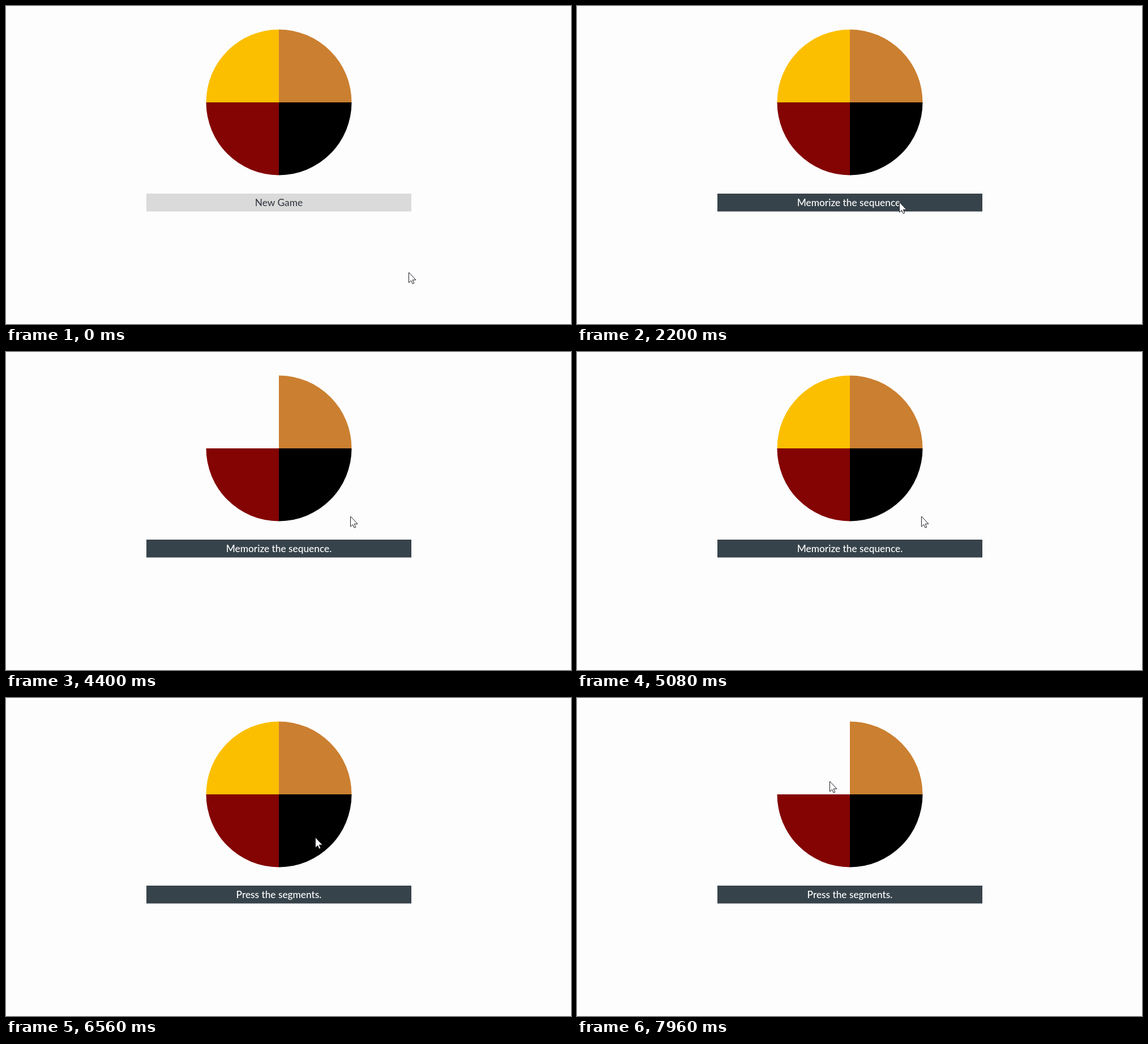
Animation, 998 px wide and 561 px high, one loop 8000 ms. Source, as an HTML page:

```html
<!DOCTYPE html>
<html lang="en">
<head>
<meta charset="utf-8">
<title>Memory game</title>
<style>
  html, body { margin: 0; width: 100%; height: 100%; overflow: hidden; background: #fdfdfd; }
  svg { display: block; width: 998px; height: 561px; }
  text { font: 500 17.3px Lato, sans-serif; text-anchor: middle; }
</style>
</head>
<body>
<svg viewBox="0 0 998 561">
  <defs><path id="quarter" d="M0 0V-128.5A128.5 128.5 0 0 1 128.5 0Z"/></defs>
  <g transform="translate(482 170)">
    <use href="#quarter" fill="#cb7f30"/>
    <use href="#quarter" fill="#000" transform="rotate(90)"/>
    <use href="#quarter" fill="#840303" transform="rotate(180)"/>
    <use href="#quarter" id="yellow" fill="#fcbf00" transform="rotate(270)"/>
  </g>
  <rect id="bar" x="248" y="331" width="468" height="31.5"/>
  <text id="label" x="482" y="353"></text>
  <path id="cursor" d="M.5 0V18L4.6 14.4L7.2 20.2L9.8 19L7.2 13.2H13Z"
        fill="#fff" stroke="#1c1c24"/>
</svg>
<script>
const LOOP = 8000;
const GLIDE = 700;       // duration of each cursor move
const START = 1960;      // button pressed
const TURN = 6000;       // player's turn begins
const PRESS = 7880;      // player presses the yellow segment

const home = { x: 711, y: 470 };
const stops = [
  { at: 1600, x: 569, y: 346 },   // button
  { at: 3240, x: 608, y: 290 },   // beside the disc
  { at: 5760, x: 589, y: 275 },
  { at: 6560, x: 546, y: 246 },   // black segment
  { at: 7640, x: 446, y: 147 }    // yellow segment
];

const [yellow, bar, label, cursor] =
  ['yellow', 'bar', 'label', 'cursor'].map(id => document.getElementById(id));
const clamp = u => Math.min(1, Math.max(0, u));
const ease = u => u * u * (3 - 2 * u);

function cursorAt(t) {
  let { x, y } = home;
  for (const stop of stops) {
    const u = ease(clamp((t - stop.at) / GLIDE + 1));
    x += (stop.x - x) * u;
    y += (stop.y - y) * u;
  }
  return { x, y };
}

function draw(t) {
  const started = t >= START;
  const flashing = t >= PRESS || (t >= 4000 && t < 5000);
  const { x, y } = cursorAt(t);
  yellow.setAttribute('visibility', flashing ? 'hidden' : 'visible');
  bar.setAttribute('fill', started ? '#37434b' : '#dadada');
  label.setAttribute('fill', started ? '#fff' : '#3b3e48');
  label.textContent = !started ? 'New Game'
    : t < TURN ? 'Memorize the sequence.' : 'Press the segments.';
  cursor.setAttribute('transform', `translate(${x} ${y})`);
}

const origin = performance.now();
function tick() {
  draw((performance.now() - origin) % LOOP);
  requestAnimationFrame(tick);
}
tick();
</script>
</body>
</html>
```
